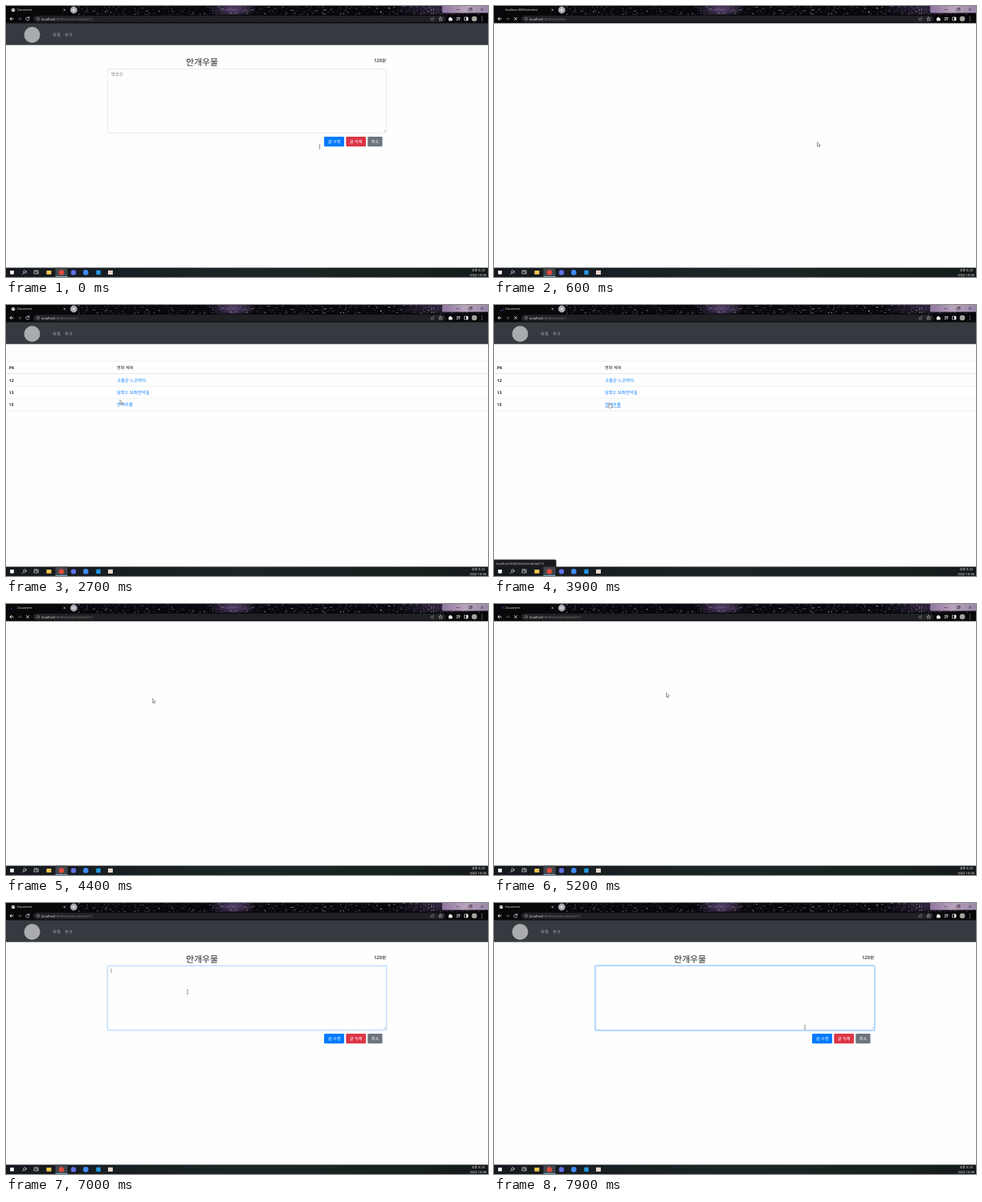
Recreate the animation shown at these times as an HTML page. Size 600 px wide and 338 px high, loop 8000 ms.

```html
<!DOCTYPE html>
<html lang="ko">
<head>
<meta charset="utf-8">
<title>Document</title>
<style>
  html, body { margin: 0; width: 100%; height: 100%; overflow: hidden; background: #fefefe; }
  svg { display: block; width: 100vw; height: 100vh; }
  text { font: 5.4px "Open Sans", "Noto Sans CJK KR", "Noto Sans CJK", sans-serif; text-rendering: geometricPrecision; }
  .line { fill: none; stroke: #dfe1e5; stroke-width: .7; stroke-linecap: round; stroke-linejoin: round; }
  .bold { font-weight: 700; }
  .link { fill: #007bff; font-weight: 500; }
  .nav { fill: #a2a5a8; }
  .button text { fill: #fff; text-anchor: middle; font-size: 5.2px; }
  .clock { fill: #fff; font-size: 4px; text-anchor: end; }
  .rule { stroke: #dee2e6; stroke-width: .5; }
</style>
</head>
<body>
<svg viewBox="0 0 600 338">
  <defs>
    <radialGradient id="nebula">
      <stop offset="0" stop-color="#5b4472"/>
      <stop offset="1" stop-color="#5b4472" stop-opacity="0"/>
    </radialGradient>
    <linearGradient id="bar">
      <stop offset="0" stop-color="#15191e"/>
      <stop offset=".5" stop-color="#1b2526"/>
      <stop offset=".85" stop-color="#17211f"/>
      <stop offset="1" stop-color="#14181b"/>
    </linearGradient>
    <linearGradient id="controls">
      <stop offset="0" stop-color="#8e75a0"/>
      <stop offset=".5" stop-color="#b9a3bb"/>
      <stop offset="1" stop-color="#9a88a8"/>
    </linearGradient>
  </defs>
  <rect width="600" height="338" fill="#fefefe"/>

  <g id="shared">
    <rect y="21" width="600" height="27.7" fill="#343a40"/>
    <circle cx="32.5" cy="36" r="10" fill="#a9abad"/>
    <text class="nav" x="58" y="37.6">목록</text>
    <text class="nav" x="73" y="37.6">추가</text>
  </g>

  <g id="detail">
    <text x="224" y="74" fill="#212529" style="font-size:10.9px">안개우물</text>
    <text x="473.5" y="70.2" fill="#212529" text-anchor="end" style="font-size:5.9px"><tspan font-weight="600">120</tspan>분</text>
    <rect id="ring" x="126" y="78" width="348" height="81" rx="1.6" fill="none" stroke="#007bff" stroke-opacity=".28" stroke-width="1.9"/>
    <rect id="area" x="126.6" y="78.6" width="346.8" height="79.7" rx="1" fill="#fefefe" stroke-width=".5"/>
    <path d="M470.2 157l2.4-2.4M471.6 157l1-1" stroke="#777" stroke-width=".4"/>
    <text id="note" x="130.7" y="86.6" fill="#6b7279">멋있고</text>
    <path id="caret" d="M131 81.7v5.6" stroke="#333" stroke-width=".5"/>
    <g class="button">
      <rect id="edit" x="396" y="163" width="25" height="12.2" rx="1.2"/>
      <text x="408.7" y="171.2">글 수정</text>
      <rect x="423.3" y="163" width="24.7" height="12.2" rx="1.2" fill="#dc3545"/>
      <text x="435.7" y="171.2">글 삭제</text>
      <rect x="450.2" y="163" width="18.3" height="12.2" rx="1.2" fill="#6c757d"/>
      <text x="459.4" y="171.2">취소</text>
    </g>
  </g>

  <g id="list" fill="#212529">
    <path class="rule" d="M0 70h600M0 101.2h600M0 116.7h600M0 132h600"/>
    <path class="rule" d="M0 85.6h600" style="stroke-width:.9"/>
    <text class="bold" x="3.8" y="80" style="font-size:5px">PK</text>
    <text x="138" y="80" style="font-size:5.2px;font-weight:500">영화 제목</text>
    <text class="bold" x="3.8" y="95.6" style="font-size:5px">12</text>
    <text class="link" x="138" y="95.6">구름은 느긋하다</text>
    <text class="bold" x="3.8" y="111" style="font-size:5px">13</text>
    <text class="link" x="138" y="111">담장2: 모래언덕길</text>
    <text class="bold" x="3.8" y="126.3" style="font-size:5px">15</text>
    <text class="link" x="138" y="126.3">안개우물</text>
    <path id="underline" d="M138 127.6h20" stroke="#0056b3" stroke-width=".4"/>
  </g>

  <g id="status">
    <path d="M0 317.5h76q1.5 0 1.5 1.5v8H0z" fill="#1b1b1e"/>
    <text x="2.5" y="324" fill="#c8cacd" style="font-size:4px">localhost:8000/articles/detail/15</text>
  </g>

  <g id="browser">
    <rect width="600" height="12" fill="#08070d"/>
    <ellipse cx="283" cy="4" rx="30" ry="12" fill="url(#nebula)"/>
    <ellipse cx="540" cy="3" rx="60" ry="12" fill="url(#nebula)" opacity=".5"/>
    <g id="stars" fill="#f1eef8"></g>
    <rect x="543" width="57" height="8.6" fill="url(#controls)"/>
    <path class="line" d="M561 4.6h3M576.6 3.4h2.6v2.6h-2.6zM577.6 2.5h2.5v2.6M591.2 3l2.8 2.8M594 3l-2.8 2.8" style="stroke:#2b2533;stroke-width:.6"/>
    <path class="line" d="M395.8 4.4l1.2 1.2 1.2-1.2"/>
    <path d="M0 0h76q2.5 0 2.5 2.5V11H600V21.6H0z" fill="#08080a"/>
    <circle cx="84.3" cy="5" r="4.4" fill="#a9a9af"/>
    <path d="M82.5 5h3.6M84.3 3.2v3.6" stroke="#fff" stroke-width=".7"/>
    <g id="globe">
      <circle cx="9" cy="5" r="2.3" fill="#e6e8eb"/>
      <path d="M7.2 4l1.8.5-.6 1.5M9.8 3l.7 1 .5 1.5" fill="none" stroke="#333" stroke-width=".6"/>
    </g>
    <circle id="spinner" cx="9" cy="5" r="2.4" fill="none" stroke="#3b55b5" stroke-width=".7" pathLength="100"/>
    <text id="tab" x="14" y="6.4" fill="#e8eaed" style="font-size:3.75px"></text>
    <path class="line" d="M71.8 3.9l2 2M73.8 3.9l-2 2" style="stroke-width:.6"/>
    <path class="line" d="M9 16H5M6.8 14.2L5 16l1.8 1.8" style="stroke:#fff;stroke-width:.8"/>
    <path class="line" d="M15 16h4M17.2 14.2L19 16l-1.8 1.8" style="stroke:#606166"/>
    <path id="reload" class="line" d="M28.6 14.8a2.1 2.1 0 1 0 .3 2M28.9 13.4v1.7h-1.7"/>
    <path id="stop" class="line" d="M25.2 14.2l3.4 3.4M28.6 14.2l-3.4 3.4" style="stroke:#fff"/>
    <rect x="34" y="12" width="513" height="8.2" rx="4.1" fill="#202124"/>
    <g class="line" style="stroke:#9a9da2;stroke-width:.5">
      <circle cx="39.8" cy="16" r="1.9"/>
      <path d="M39.8 15.8v1.2M39.8 14.9v.1M529 15v2.8h3.2v-1M530 16.4q.5-1.7 2.7-1.7M531.8 13.8l1 .9-1 .9"/>
    </g>
    <text x="44" y="17.5" fill="#e8eaed" style="font-size:4.25px">localhost<tspan id="path" fill="#7f8287"></tspan></text>
    <path class="line" d="M541 13.8l.7 1.5 1.7.2-1.3 1.1.4 1.7-1.5-.9-1.5.9.4-1.7-1.3-1.1 1.7-.2z" style="stroke-width:.5"/>
    <path d="M551 14.7h1.2a.9.9 0 0 1 1.8 0h1.2v1.2a.9.9 0 0 1 0 1.8v.9H551z" fill="#f1f3f4"/>
    <path class="line" d="M561 14.4h3.6M561 16h2.4M561 17.6h1.6M564.3 17.7v-2.7h1.2"/>
    <path class="line" d="M571 14h4v4h-4z"/>
    <path d="M573 14h2v4h-2z" fill="#f1f3f4"/>
    <circle cx="583" cy="16" r="3.3" fill="#a5a29c"/>
    <path d="M592.5 13.8v.1M592.5 16v.1M592.5 18.2v.1" class="line" style="stroke-width:.9"/>
  </g>

  <g id="taskbar">
    <rect y="326.4" width="600" height="11.6" fill="url(#bar)"/>
    <rect x="61.5" y="326.4" width="15" height="11.6" fill="#41464b"/>
    <rect x="61.5" y="337.2" width="15" height=".8" fill="#83bde8"/>
    <rect x="5.2" y="330" width="4.6" height="4.6" fill="#fff"/>
    <g class="line" style="stroke:#fff;stroke-width:.6">
      <circle cx="23.4" cy="331.6" r="1.7"/>
      <path d="M22.2 332.9l-1.8 1.8M35.3 331h3.6v3h-3.6zM35.3 329.8h3.6M40.2 330v4.2"/>
    </g>
    <rect x="50.4" y="330" width="6" height="4.8" fill="#f4c64f"/>
    <circle cx="69" cy="332.4" r="3.2" fill="#df4b3c"/>
    <circle cx="84" cy="332.4" r="3.2" fill="#6370e8"/>
    <circle cx="99.3" cy="332.4" r="3.3" fill="#3f8cf5"/>
    <rect x="112.3" y="329.7" width="5.4" height="5.4" fill="#2398e5"/>
    <rect x="127" y="329.8" width="6" height="5.2" fill="#e9d5c9"/>
    <text class="clock" x="596" y="331.4">오후 5:23</text>
    <text class="clock" x="598" y="336.9">2022-10-06</text>
  </g>

  <g id="pointer">
    <path id="arrow" d="M0 0v5.2l1.2-1.1.9 2 .9-.4-.9-1.9h1.6z" fill="#fff" stroke="#222" stroke-width=".45"/>
    <path id="beam" d="M-.9-2.6q.9 0 .9.6 0-.6.9-.6M0-2v4M-.9 2.6q.9 0 .9-.6 0 .6.9.6" fill="none" stroke="#444" stroke-width=".55"/>
    <path id="hand" d="M-.6 0q.6-.5 1.1 0v2l2.2.6q.7.3.6 1l-.5 2.4H.1l-1.8-2.4q.2-.8 1.1-.2z" fill="#fff" stroke="#222" stroke-width=".4"/>
  </g>
</svg>
<script>
const DURATION = 8000, STEP = 100;
const el = id => document.getElementById(id);
const show = (id, on) => { el(id).style.display = on ? '' : 'none'; };
const within = (t, from, to) => t >= from && t < to;

// time, x, y
const track = [
  [0, 390.5, 175.5], [200, 394, 179.6], [400, 402.5, 169.7], [600, 402.5, 169.7],
  [900, 304, 123.6], [1800, 294.6, 118.2], [2700, 142, 118.6], [3000, 143.5, 122.3],
  [3900, 143.5, 122.3], [4400, 182.3, 118], [4800, 214.5, 110.7], [5500, 214.5, 110.7],
  [5800, 226, 110.8], [7400, 226, 110.8], [7900, 387, 154.7]
];

function pointerAt(t) {
  const next = track.findIndex(key => key[0] > t);
  if (next < 0) return track[track.length - 1].slice(1);
  const [start, x0, y0] = track[next - 1], [end, x1, y1] = track[next];
  const k = (t - start) / (end - start);
  const eased = k * k * (3 - 2 * k);
  return [x0 + (x1 - x0) * eased, y0 + (y1 - y0) * eased];
}

function scatterStars() {
  let seed = 71;
  const random = () => (seed = seed * 16807 % 2147483647) / 2147483647;
  let markup = '';
  for (const opacity of [.2, .4, .8]) {
    let d = '';
    for (let i = 0; i < 190; i++) {
      const size = .4 + random() * .6;
      d += `M${(78 + random() * 522).toFixed(1)} ${(random() * 11).toFixed(1)}h${size}v${size}h${-size}z`;
    }
    markup += `<path d="${d}" opacity="${opacity}"/>`;
  }
  el('stars').innerHTML = markup;
}

function drawSpinner(t) {
  const arc = 4 + 70 * Math.sin(Math.PI * (t - 600) / 1200) ** 2;
  el('spinner').setAttribute('stroke-dasharray', `${arc} ${100 - arc}`);
  el('spinner').setAttribute('transform', `rotate(${t * .23 + 180} 9 5)`);
}

function render(t) {
  const detail = t < 500 || t >= 5300;
  const list = within(t, 2000, 4000);
  const loading = within(t, 400, 2100) || within(t, 3900, 5400);
  const hover = within(t, 2900, 4100);
  const onButton = within(t, 300, 500);
  const beam = t < 200 || t >= 5600;
  const focus = Math.min(1, Math.max(0, (t - 6900) / 300));

  show('shared', detail || list);
  show('detail', detail);
  show('list', list);
  show('note', t < 500);
  show('underline', hover);
  show('status', within(t, 3000, 4000));
  show('globe', !loading);
  show('spinner', loading);
  show('reload', !loading);
  show('stop', loading);
  show('caret', within(t, 7000, 7500));
  show('beam', beam);
  show('hand', hover || onButton);
  show('arrow', !beam && !hover && !onButton);

  el('ring').style.opacity = focus;
  el('area').setAttribute('stroke', focus > 0 ? '#80bdff' : '#ced4da');
  el('edit').setAttribute('fill', onButton ? '#0069d9' : '#007bff');
  el('tab').textContent = within(t, 500, 800) ? 'localhost:8000/articles/' : 'Document';
  el('path').textContent = ':8000/articles/' + (within(t, 500, 4000) ? '' : 'detail/15');
  el('pointer').setAttribute('transform', `translate(${pointerAt(t)})`);
  drawSpinner(t);
}

function tick() {
  render(Math.floor(performance.now() % DURATION / STEP) * STEP);
  requestAnimationFrame(tick);
}

scatterStars();
tick();
</script>
</body>
</html>
```
